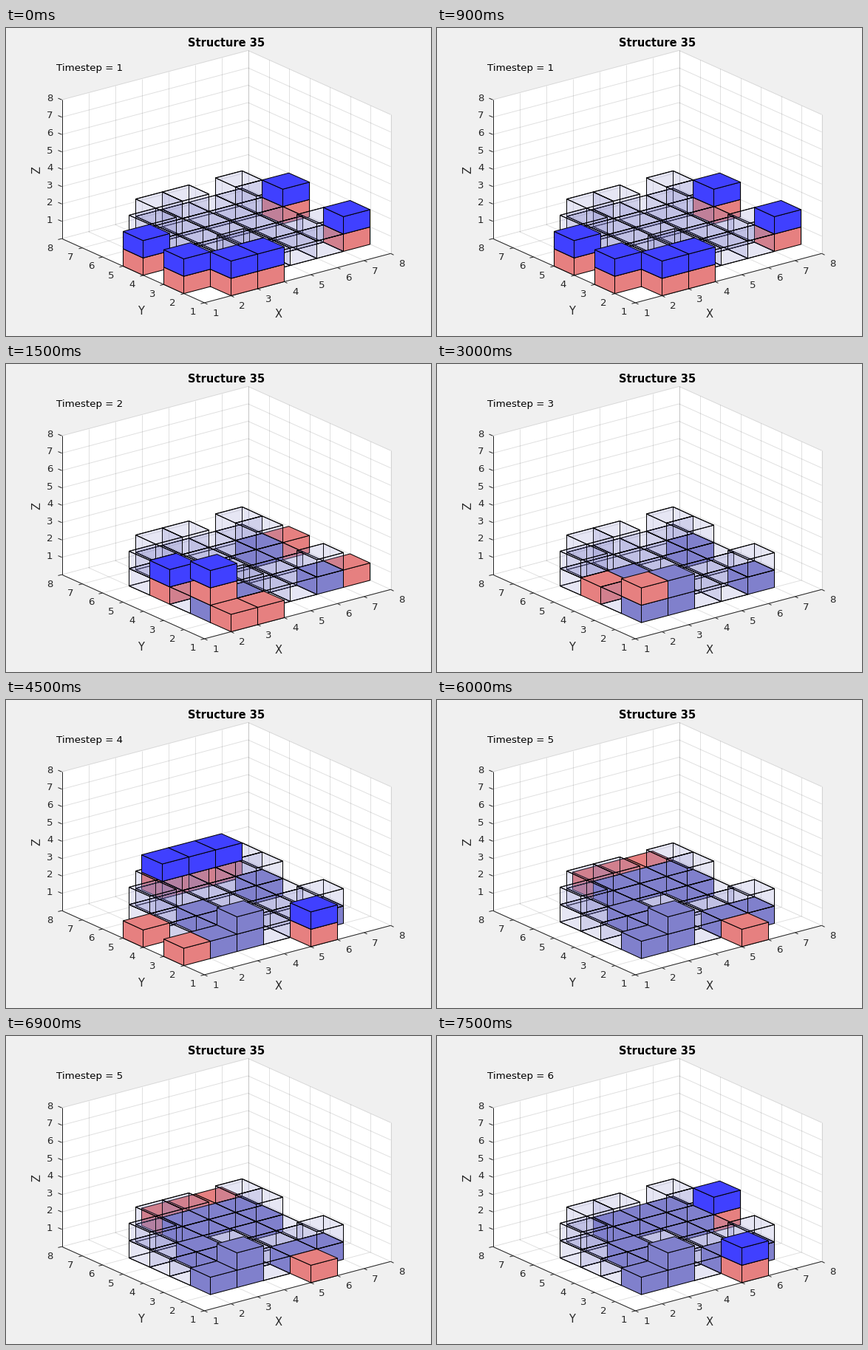
A matplotlib script for the animation above (8 s loop, 575 by 417 pixels).

```python
import matplotlib.pyplot as plt
from matplotlib.animation import FuncAnimation
from matplotlib.collections import LineCollection, PolyCollection

W, H, DPI = 575, 417, 96
BLUE = (0.25, 0.25, 1, 1)
RED = (0.9, 0.5, 0.5, 1)
BUILT = (0.5, 0.5, 0.8, 1)
GHOST = (0.5, 0.5, 0.8, 0.1)
INK = (0.15, 0.15, 0.15)


def project(x, y, z):
    px = 268 + 36 * (x - 1) - 27.57 * (y - 1)
    py = 371.5 - 9.53 * (x - 1) - 12.4 * (y - 1) - 23.5 * z
    return round(px), py


# Planned cells: a 5 x 5 floor without one corner, plus a few upper cells
plan = {(x, y, 0) for x in range(2, 7) for y in range(2, 7)} - {(2, 6, 0)}
plan |= {(2, 5, 1), (3, 6, 1), (4, 6, 1), (6, 6, 1), (6, 5, 1),
         (6, 2, 1), (3, 2, 1)}

# Per step: robots carrying a block, robots without one, blocks newly placed
steps = [
    ([(1, 4, 0), (1, 2, 0), (2, 1, 0), (3, 1, 0), (7, 2, 0), (7, 5, 0)],
     [], []),
    ([(2, 4, 0), (2, 2, 1)],
     [(2, 1, 0), (3, 1, 0), (7, 2, 0), (7, 5, 0)],
     [(2, 2, 0), (3, 2, 0), (6, 2, 0), (6, 5, 0)]),
    ([], [(2, 4, 0), (2, 2, 1)], [(3, 4, 0), (3, 2, 1)]),
    ([(4, 7, 0), (5, 7, 0), (6, 7, 0), (5, 1, 0)],
     [(1, 4, 0), (1, 2, 0)], []),
    ([], [(4, 7, 0), (5, 7, 0), (6, 7, 0), (5, 1, 0)],
     [(4, 6, 0), (5, 6, 0), (6, 6, 0), (5, 2, 0)]),
    ([(7, 5, 0), (5, 1, 0)], [], []),
]


def faces(cell, hollow):
    x, y, z = cell
    X, Y, Z = x + 1, y + 1, z + 1
    back = [[(x, y, z), (X, y, z), (X, Y, z), (x, Y, z)],
            [(X, y, z), (X, Y, z), (X, Y, Z), (X, y, Z)],
            [(x, Y, z), (X, Y, z), (X, Y, Z), (x, Y, Z)]]
    front = [[(x, y, z), (x, Y, z), (x, Y, Z), (x, y, Z)],
             [(x, y, z), (X, y, z), (X, y, Z), (x, y, Z)],
             [(x, y, Z), (X, y, Z), (X, Y, Z), (x, Y, Z)]]
    quads = back + front if hollow else front
    return [[project(*p) for p in q] for q in quads]


def scene(step):
    cells = {c: GHOST for c in plan}
    for _, _, placed in steps[:step + 1]:
        cells.update({c: BUILT for c in placed})
    loaded, free, _ = steps[step]
    cells.update({c: RED for c in loaded + free})
    cells.update({(x, y, z + 1): BLUE for x, y, z in loaded})

    def order(item):
        (x, y, z), color = item
        return z, color == BLUE, -x - y

    quads, colors = [], []
    for cell, color in sorted(cells.items(), key=order):
        part = faces(cell, color == GHOST)
        quads += part
        colors += [color] * len(part)
    return quads, colors


fig = plt.figure(figsize=(W / DPI, H / DPI), dpi=DPI, facecolor="#f0f0f0")
ax = fig.add_axes([0, 0, 1, 1])
ax.set_xlim(-0.5, W - 0.5)
ax.set_ylim(H - 0.5, -0.5)
ax.axis("off")

walls = [[(1, 1, 0), (8, 1, 0), (8, 8, 0), (1, 8, 0)],
         [(1, 8, 0), (8, 8, 0), (8, 8, 8), (1, 8, 8)],
         [(8, 1, 0), (8, 8, 0), (8, 8, 8), (8, 1, 8)]]
ax.add_collection(PolyCollection([[project(*p) for p in w] for w in walls],
                                 facecolors="white", edgecolors="none"))


def lines(segments, color, width):
    ax.add_collection(LineCollection(
        [[project(*p) for p in s] for s in segments],
        colors=[color], linewidths=width))


grid = []
for n in range(1, 9):
    grid += [[(n, 1, 0), (n, 8, 0)], [(n, 8, 0), (n, 8, 8)],
             [(1, n, 0), (8, n, 0)], [(8, n, 0), (8, n, 8)],
             [(1, 8, n), (8, 8, n)], [(8, 1, n), (8, 8, n)]]
lines(grid, INK + (0.15,), 0.7)

axes = [[(1, 8, 0), (1, 8, 8)], [(1, 8, 0), (1, 1, 0)], [(1, 1, 0), (8, 1, 0)]]
for n in range(1, 9):
    axes += [[(n, 1, 0), (n, 0.84, 0)], [(1, n, 0), (0.87, n, 0)],
             [(1, 8, n), (1, 8.17, n)]]
lines(axes, INK, 0.75)


def label(x, y, text, size=10, ha="center", color=INK, **kw):
    return ax.text(x, y, text, fontsize=size, ha=ha, color=color,
                   family="DejaVu Sans", **kw)


for n in range(1, 9):
    k = n - 1
    label(283 + 36 * k, 389.5 - 9.53 * k, n)
    label(252.5 - 27.6 * k, 388 - 12.4 * k, n)
    label(63, 263.5 - 23.6 * k, n, ha="right")
label(368, 392, "X", 11)
label(182, 387, "Y", 11)
label(41, 191, "Z", 11, rotation=90, va="center")
label(298, 24, "Structure 35", 11, color="black", weight="bold")
clock = label(68, 57, "", ha="left", color="black")

blocks = PolyCollection([], edgecolors="black", linewidths=0.75, zorder=3)
ax.add_collection(blocks)


def draw(frame):
    step = frame // 3
    quads, colors = scene(step)
    blocks.set_verts(quads)
    blocks.set_facecolor(colors)
    clock.set_text(f"Timestep = {step + 1}")
    return blocks, clock


anim = FuncAnimation(fig, draw, frames=16, interval=500, repeat=True)
plt.show()
```
